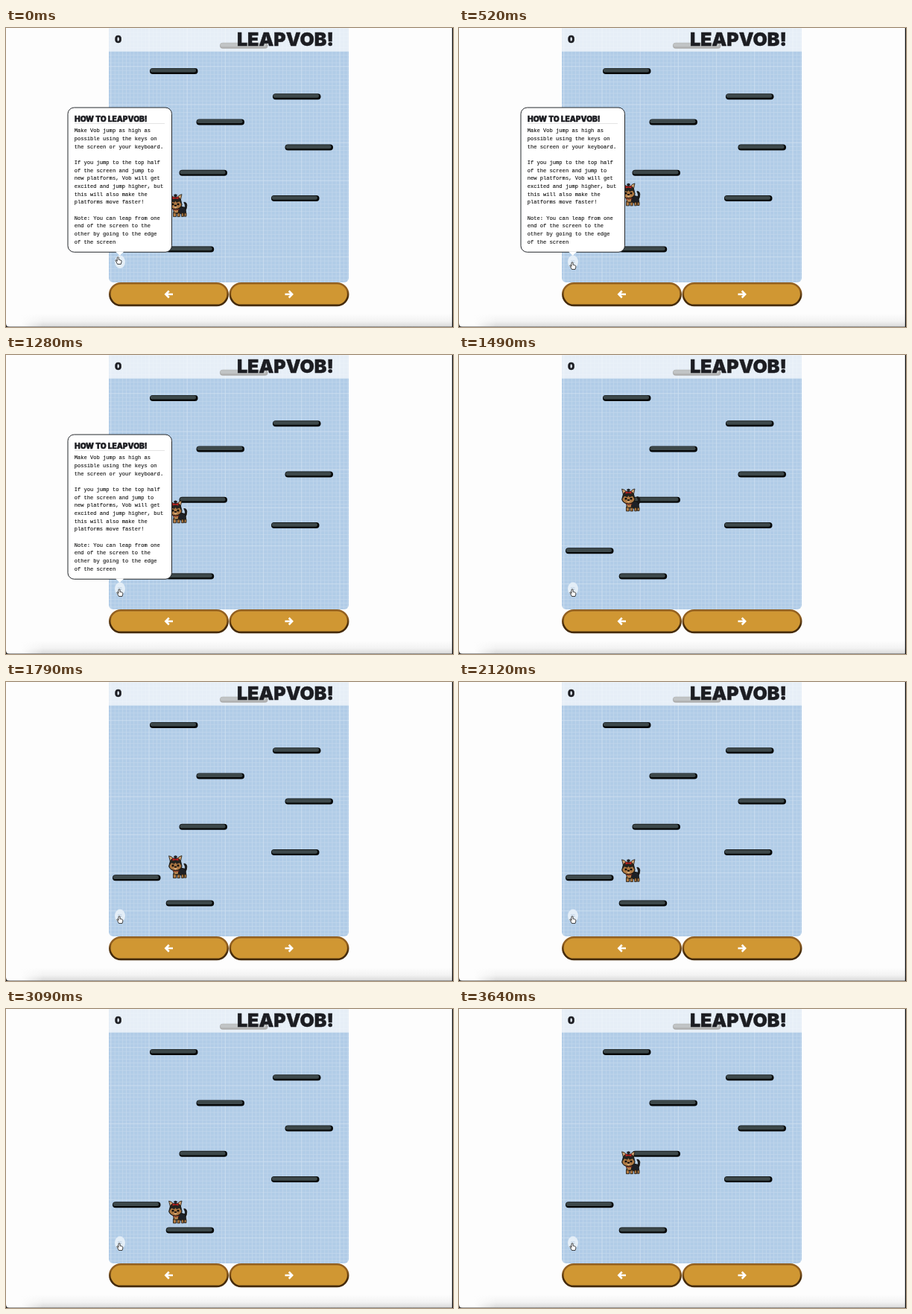
An HTML page that plays this animation: 600x402 px, repeating every 3.67 s.

```html
<!DOCTYPE html>
<html lang="en">
<head>
<meta charset="utf-8">
<title>Leapvob</title>
<style>
  html, body { margin: 0; width: 100%; height: 100%; overflow: hidden; background: #fdfdfd; }
  svg { display: block; width: 600px; height: 402px; }
  .title { font-family: Inter, "Open Sans", sans-serif; font-weight: 900; fill: #1c1d22; stroke: #1c1d22; stroke-width: .4; }
  .copy { font: 7.11px "Liberation Mono", "DejaVu Sans Mono", monospace; fill: #111; stroke: #111; stroke-width: .12; white-space: pre; }
</style>
</head>
<body>
<svg viewBox="0 0 600 402">
  <defs>
    <pattern id="minor" x="140.6" y="0.4" width="5.12" height="5.12" patternUnits="userSpaceOnUse">
      <path d="M0 .4H5.12M.4 0V5.12" stroke="#fff" stroke-width=".7" opacity=".22"/>
    </pattern>
    <pattern id="major" x="140.1" y="-0.1" width="51.2" height="51.2" patternUnits="userSpaceOnUse">
      <path d="M0 .5H51.2M.5 0V51.2" stroke="#fff" opacity=".2"/>
    </pattern>
    <linearGradient id="floor" x2="0" y2="1">
      <stop offset="0" stop-color="#fdfdfd"/>
      <stop offset=".55" stop-color="#f3f3f3"/>
      <stop offset="1" stop-color="#d9d9d9"/>
    </linearGradient>
    <linearGradient id="fade">
      <stop offset=".4" stop-color="#fdfdfd"/>
      <stop offset="1" stop-color="#fdfdfd" stop-opacity="0"/>
    </linearGradient>
    <linearGradient id="rim" x1=".53" x2=".47" y2="1">
      <stop offset=".3" stop-color="#936020"/>
      <stop offset=".7" stop-color="#452b0b"/>
    </linearGradient>
    <clipPath id="board"><path d="M138 0H460V336a6 6 0 0 1-6 6H144a6 6 0 0 1-6-6Z"/></clipPath>
    <g id="platform">
      <rect width="64.5" height="8" rx="4" fill="#050707"/>
      <rect x=".8" y=".6" width="61.2" height="5" rx="2.5" fill="#3d484a"/>
    </g>
    <g id="button">
      <rect x="1.3" y="1.3" width="158.4" height="29.6" rx="14.8" fill="#d09733" stroke="url(#rim)" stroke-width="2.6"/>
      <path d="M86 16H77M80.8 11.5L76.3 16L80.8 20.5" fill="none" stroke="#fff" stroke-width="2.5"/>
    </g>
  </defs>

  <rect width="600" height="402" fill="#fdfdfd"/>
  <rect y="384" width="600" height="18" fill="url(#floor)"/>
  <rect y="384" width="50" height="18" fill="url(#fade)"/>
  <path d="M0 401.6H600" stroke="#777" stroke-width=".8"/>
  <path d="M599.4 0V402" stroke="#0b0b0b" stroke-width="1.2"/>
  <path d="M0 397Q0 402 5 402H0Z" fill="#222"/>

  <g clip-path="url(#board)">
    <rect x="138" width="322" height="342" fill="#b1cce7"/>
    <rect x="138" width="322" height="342" fill="url(#minor)"/>
    <rect x="138" width="322" height="342" fill="url(#major)"/>
    <g id="platforms"></g>
    <g id="dog" stroke="#17130f" stroke-width=".8" stroke-linejoin="round">
      <path d="M19.5 21Q23 19.5 22.3 15L20.8 11.5Q24.4 11 24.8 15.5Q25 20 22 24Z" fill="#16181d"/>
      <path d="M8 17Q15 15.5 22 18.5L23.6 24V28H18L16 26.5H7Z" fill="#1d2026"/>
      <path d="M6.5 25h4v5.7h-4zM12 26h3.4v4.7H12zM17.6 26h2.8v4.6h-2.8zM21.2 26h2.8v4.3h-2.8z" fill="#b07a42"/>
      <path d="M6 20H14L13 26H8Z" fill="#b98750"/>
      <path d="M.6 1Q5 1.5 6.8 5L2.8 10ZM18 .8Q13.6 1.5 12 5L16 10Z" fill="#d0a372"/>
      <path d="M2.2 9Q3.5 3.8 9.4 3.8T16.8 9L18.2 15Q17 20.5 9.5 21Q2 20.5 .6 15Z" fill="#24231f"/>
      <g stroke="none">
        <path d="M1.4 14.5L4 10.5L8 12L9.4 10L11 12L15 10.5L17.4 14.5Q16.5 19.8 9.5 20.2Q2.3 19.8 1.4 14.5Z" fill="#b07a44"/>
        <path d="M4.6 12.8h2.8v2.6H4.6zM11.6 12.8h2.8v2.6h-2.8zM8 15h3v1.8H8z" fill="#15110e"/>
        <path d="M6.5 17.2H12.5L9.5 19.6Z" fill="#d5aa78"/>
        <path d="M5.5 4L9.5 5.2L13.5 4V7.4L9.5 6.4L5.5 7.4Z" fill="#b5211f"/>
        <path d="M6.8 2Q9.5-1 12.2 2L9.5 4.4Z" fill="#1d1f23"/>
        <path d="M6 21Q10 23.6 14.5 21" fill="none" stroke="#8c2a20" stroke-width="1"/>
      </g>
    </g>
    <rect x="138" width="322" height="31.5" fill="#fff" opacity=".68"/>
  </g>
  <text class="title" x="146" y="20" font-size="13">0</text>
  <text class="title" x="440" y="24.3" font-size="25" text-anchor="end">LEAPVOB!</text>

  <use href="#button" x="138" y="342"/>
  <use href="#button" transform="translate(460.5 342) scale(-1 1)"/>

  <ellipse cx="153" cy="314.3" rx="7" ry="8.7" fill="#e4eef7"/>
  <path d="M150 313h5.5M150 315.4h5.5" stroke="#b3c7dc" stroke-width=".8"/>

  <g id="help">
    <rect x="83" y="107" width="139.5" height="194.3" rx="8.5" fill="#fff" stroke="#25282c"/>
    <path d="M147 300.6L152.7 306L158.4 300.6Z" fill="#fff"/>
    <text class="title" x="92" y="125.5" font-size="10.2">HOW TO LEAPVOB!</text>
    <path d="M92 128.5H213" stroke="#dedede" stroke-width=".8"/>
    <g id="copy"></g>
  </g>

  <path id="hand" d="M-1.8 1V-4Q-.7-5.3.3-4V-1L3-.4Q4.4 0 4 2L3.2 5H-1.4L-4-.2Q-3.5-1.5-2.6-.3Z"
        fill="#fff" stroke="#222" stroke-width=".85" stroke-linejoin="round"/>
</svg>

<script>
const LOOP = 3670, HELP_CLOSES = 1300, GROUND = 263;
const $ = id => document.getElementById(id);

function add(parent, tag, attrs, text = "") {
  const el = document.createElementNS("http://www.w3.org/2000/svg", tag);
  for (const key in attrs) el.setAttribute(key, attrs[key]);
  el.textContent = text;
  parent.append(el);
}

[287, 193, 358, 255.5, 374.5, 232.5, 356, 143, 214.7].forEach((x, i) =>
  add($("platforms"), "use", { href: "#platform", x, y: 19.7 + i * 34.23 }));

`Make Vob jump as high as
possible using the keys on
the screen or your keyboard.

If you jump to the top half
of the screen and jump to
new platforms, Vob will get
excited and jump higher, but
this will also make the
platforms move faster!

Note: You can leap from one
end of the screen to the
other by going to the edge
of the screen`.split("\n").forEach((line, i) =>
  add($("copy"), "text", { class: "copy", x: 91.7, y: 140.3 + i * 10.66 }, line));

// [time, height above the landing platform]
const bounce = [
  [0, 40], [330, 90], [520, 55], [840, 0], [1030, 30], [1440, 92], [1490, 84],
  [1960, 0], [2120, 25], [2550, 91], [2730, 63], [3090, 6], [3120, 0], [3640, 72], [LOOP, 76]
];

function valueAt(steps, t) {
  const i = Math.max(1, steps.findIndex(([time]) => time >= t));
  const [t0, a] = steps[i - 1], [t1, b] = steps[i];
  return a + (b - a) * (t - t0) / (t1 - t0);
}

function draw(t) {
  $("dog").setAttribute("transform", `translate(218 ${GROUND - valueAt(bounce, t)})`);
  const k = Math.min(1, t / 300);
  $("hand").setAttribute("transform", `translate(${151 + 1.8 * k} ${312.5 + 7 * k})`);
  $("help").style.display = t < HELP_CLOSES ? "" : "none";
}

const start = performance.now();
function tick() {
  draw((performance.now() - start) % LOOP);
  requestAnimationFrame(tick);
}
tick();
</script>
</body>
</html>
```
